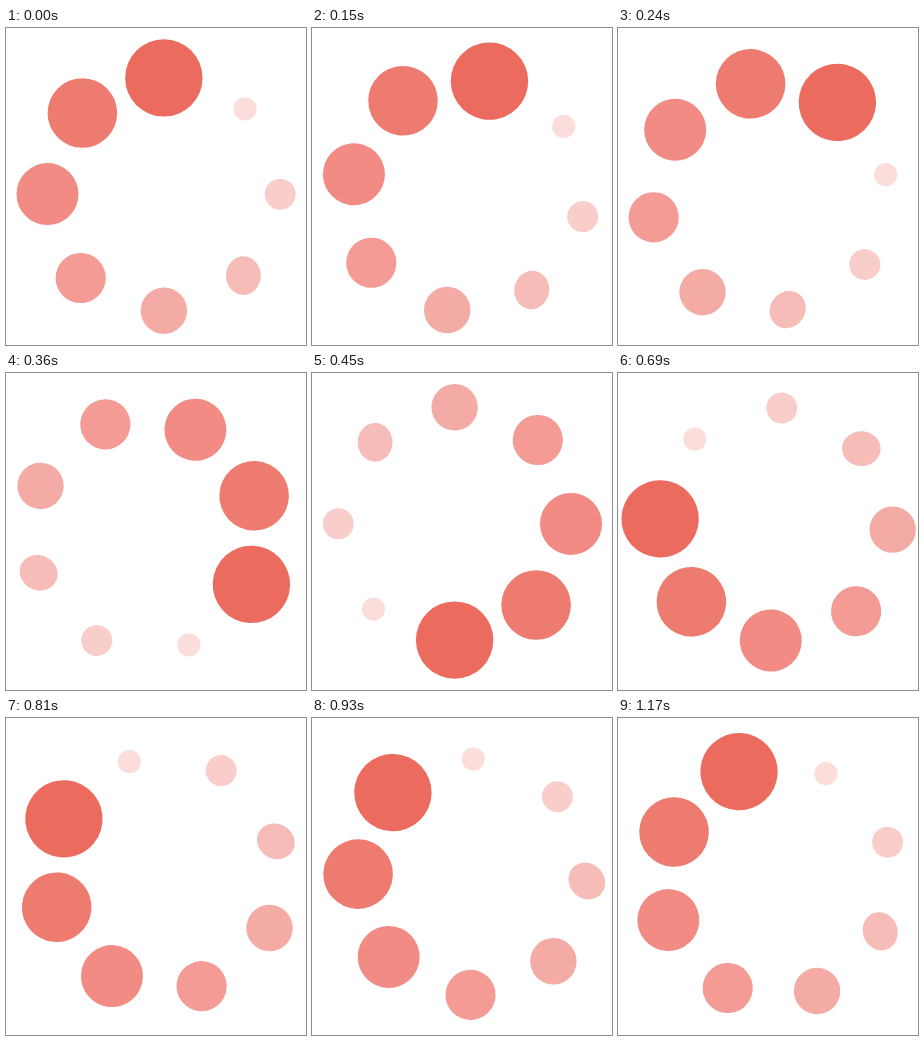
Recreate the animation shown at these times as an HTML page. Size 300 by 317 pixels, loop 1200 ms.

```html
<!DOCTYPE html>
<html lang="en">
<head>
<meta charset="utf-8">
<title>Loading</title>
<style>
  html, body { margin: 0; width: 100%; height: 100%; overflow: hidden; background: #fff; }
  svg { display: block; width: 100%; height: 100%; }
</style>
</head>
<body>
<svg viewBox="0 0 300 317">
  <g id="ring">
    <circle cx="157.85" cy="49.9" r="38.7" fill="#ec6b5f"/>
    <circle cx="76.4" cy="85" r="34.8" fill="#ee7b70"/>
    <circle cx="41.5" cy="166.1" r="31" fill="#f18b83"/>
    <circle cx="74.7" cy="250" r="25.1" fill="#f39b94"/>
    <circle cx="157.9" cy="282.7" r="23.2" fill="#f4aba6"/>
    <ellipse cx="237.4" cy="247.6" rx="17.4" ry="19.3" fill="#f6bcb8"/>
    <circle cx="274.2" cy="166.2" r="15.5" fill="#f9cdca"/>
    <circle cx="239.1" cy="80.9" r="11.6" fill="#fbdddb"/>
  </g>
</svg>
<script>
  const LOOP = 1200, STEP = 30;
  const TURN = 1800; // a full turn takes longer than the loop, so it restarts early
  const ring = document.getElementById('ring');

  // cubic-bezier(1/3, 0, 0, 1)
  function ease(x) {
    let lo = 0, hi = 1;
    for (let i = 0; i < 30; i++) {
      const s = (lo + hi) / 2;
      if (s * (1 - s) ** 2 + s ** 3 < x) lo = s; else hi = s;
    }
    return lo * lo * (3 - 2 * lo);
  }

  function draw(ms) {
    const t = Math.floor((ms % LOOP) / STEP) * STEP;
    ring.setAttribute('transform', `rotate(${360 * ease(t / TURN)} 150.25 158.5)`);
  }

  let start;
  function tick(now) {
    start ??= now;
    draw(Math.max(0, now - start));
    requestAnimationFrame(tick);
  }
  draw(0);
  requestAnimationFrame(tick);
</script>
</body>
</html>
```
